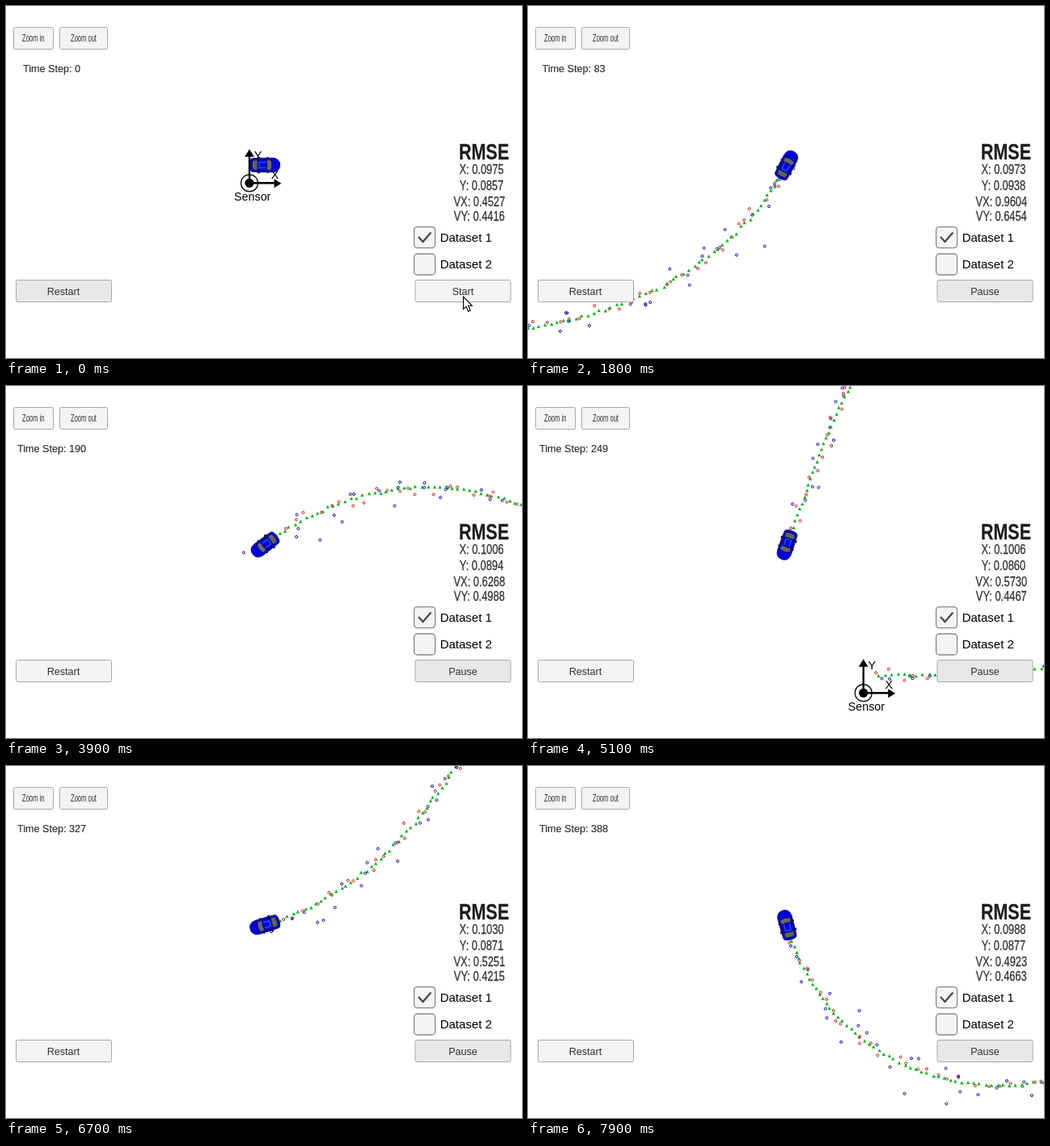
An HTML page with a canvas that plays this animation: 638 px wide and 436 px high, repeating every 8 s.

```html
<!DOCTYPE html>
<html lang="en">
<head>
<meta charset="utf-8">
<title>Tracking simulator</title>
<style>
  html, body { margin: 0; width: 100%; height: 100%; overflow: hidden; background: #fff; }
  canvas, svg { position: absolute; left: 0; top: 0; width: 638px; height: 436px; }
  text { font-family: "Liberation Sans", Arial, sans-serif; fill: #323232; text-anchor: middle; }
  .button rect { fill: #f4f4f4; stroke: #a8a8a8; }
  .button text, #step { font-size: 12.6px; }
  #step { stroke: #323232; stroke-width: .2; }
  .zoom text { font-size: 12px; }
  .box { fill: #f4f4f4; stroke: #868686; stroke-width: 1.3; }
  .label { font-size: 15px; fill: #000; text-anchor: start; }
  .panel text { font-size: 16.5px; stroke: #323232; stroke-width: .3; }
  .panel .title { font-size: 27.5px; font-weight: bold; fill: #1c1c1c; }
  #sensor text { font-size: 14.3px; fill: #000; }
</style>
</head>
<body>
<canvas id="trail" width="638" height="436"></canvas>
<svg viewBox="0 0 638 436">
  <g id="car">
    <path d="M3-10 5-7M3 10 5 7M-9-9.5h3M-9 9.5h3" stroke="#111" stroke-width="1.6"/>
    <path d="M-15.500-8.300Q-4-9 10-8.800Q18.700-8 18.700 0Q18.700 8 10 8.800Q-4 9-15.500 8.300Q-18.600 7.500-18.600 0Q-18.600-7.500-15.500-8.300Z" fill="#0000de" stroke="#00006c" stroke-width=".8"/>
    <path d="M-15-5.500Q-11-7-9-5.800V5.800Q-11 7-15 5.500Q-16.500 0-15-5.500Z" fill="#626262" stroke="#151535" stroke-width=".8"/>
    <path d="M2-5.600 7-7Q10.500 0 7 7L2 5.600Q3.500 0 2-5.600Z" fill="#686868" stroke="#151535" stroke-width=".8"/>
    <path d="M-9-7 2-7.200M-9 7 2 7.200" stroke="#101040" stroke-width="1.2"/>
    <path d="M-7-3.500H1M-7 3.500H1M-7-3.500V3.500" fill="none" stroke="#2f6ce0" stroke-width="1.1"/>
  </g>
  <g id="sensor">
    <path d="M0 0V-35M0 0H32" stroke="#000" stroke-width="2.4"/>
    <path d="M0-42 5.8-32.5H-5.8ZM39.5 .5 30.5-5V6Z"/>
    <circle r="10.5" fill="none" stroke="#000" stroke-width="1.2"/>
    <circle r="5.6"/>
    <text x="10.5" y="-29.5">Y</text>
    <text x="31.5" y="-5">X</text>
    <text x="3.7" y="22">Sensor</text>
  </g>

  <g class="button zoom">
    <rect x="9.5" y="26.5" width="49" height="27" rx="2"/>
    <rect x="66.5" y="26.5" width="59" height="27" rx="2"/>
    <text transform="translate(33.7 44.3) scale(.63 1)">Zoom in</text>
    <text transform="translate(96 44.3) scale(.63 1)">Zoom out</text>
  </g>
  <text id="step" x="56.5" y="82"></text>

  <g class="panel">
    <text class="title" transform="translate(591 189.5) scale(.78 1)">RMSE</text>
    <text class="rmse" transform="translate(588 208) scale(.78 1)"></text>
    <text class="rmse" transform="translate(588 228) scale(.78 1)"></text>
    <text class="rmse" transform="translate(585.3 248) scale(.78 1)"></text>
    <text class="rmse" transform="translate(585.3 266) scale(.78 1)"></text>
  </g>

  <rect class="box" x="504.6" y="273.6" width="26" height="26" rx="4"/>
  <rect class="box" x="504.6" y="307" width="26" height="26" rx="4"/>
  <path d="M510 286 515.5 292 525.5 280.5" fill="none" stroke="#4c4c4c" stroke-width="2.4"/>
  <text class="label" x="536.7" y="291.5">Dataset 1</text>
  <text class="label" x="536.7" y="325">Dataset 2</text>

  <g class="button">
    <rect id="restart" x="12.5" y="339.5" width="118" height="27" rx="2"/>
    <rect id="run" x="506" y="339.5" width="118" height="27" rx="2"/>
    <text x="71" y="357.6">Restart</text>
    <text id="runLabel" x="565" y="357.6"></text>
  </g>
  <path id="cursor" d="M565.5 360V375.5L569 372.3 571.7 378.3 574.2 377.2 571.6 371.3H576.3Z" fill="#fff" stroke="#000" stroke-width="1.1"/>
</svg>
<script>
const LOOP = 8000, FRAME = 100, STEPS = 400;
const CENTER = { x: 320, y: 197 }, SENSOR = { x: -19, y: 22.3 };
const $ = id => document.getElementById(id);
const ctx = $('trail').getContext('2d');
const rmseNodes = document.querySelectorAll('.rmse');
const rmseNames = ['X', 'Y', 'VX', 'VY'];

// time in ms, step, then the four errors
const keys = [
  [100, 0, .0975, .0857, 1.1775, .7247],
  [900, 40, .1018, .0885, 1.1775, .7247],
  [2800, 131, .0924, .0996, .7192, .5572],
  [3900, 190, .1006, .0894, .6268, .4988],
  [5100, 249, .1006, .0860, .5730, .4467],
  [6700, 327, .1030, .0871, .5251, .4215],
  [7900, 388, .0988, .0877, .4923, .4663]
];
const idleErrors = [.0975, .0857, .4527, .4416];

let seed = 20177;
const random = () => (seed = (seed * 48271) % 2147483647) / 2147483647;
const gauss = () => Math.sqrt(-2 * Math.log(random())) * Math.cos(2 * Math.PI * random());

// Figure eight: the turn rate is a sine over 500 steps
const phase = s => 2 * Math.PI * s / 500;
const heading = s => 125.5 * Math.PI / 180 * (1 - Math.cos(phase(s)));
const speed = s => 7.57 + .27 * Math.cos(2 * phase(s)) - .04 * Math.cos(phase(s));

const path = [{ x: 0, y: 0 }];
for (let s = 0; s < STEPS; s++) {
  const a = heading(s + .5), v = speed(s + .5);
  path.push({ x: path[s].x + v * Math.cos(a), y: path[s].y - v * Math.sin(a) });
}

// Lidar noise is Cartesian, radar noise is polar around the sensor
const marks = path.map((p, i) => {
  const radar = i % 2 === 1;
  const estimate = { x: p.x + gauss() * .9, y: p.y + gauss() * .9 };
  if (!radar) return { radar, estimate, x: p.x + gauss() * 4, y: p.y + gauss() * 4 };
  const dx = p.x - SENSOR.x, dy = p.y - SENSOR.y;
  const range = Math.hypot(dx, dy) + gauss() * 9;
  const angle = Math.atan2(dy, dx) + gauss() * .03;
  return { radar, estimate, x: SENSOR.x + range * Math.cos(angle), y: SENSOR.y + range * Math.sin(angle) };
});

function sample(t) {
  const i = Math.max(1, keys.findIndex(k => k[0] >= t));
  const a = keys[i - 1], b = keys[i];
  const f = Math.max(0, (t - a[0]) / (b[0] - a[0]));
  const [, step, ...errors] = a.map((v, j) => v + (b[j] - v) * f);
  const n = Math.round(step);
  if (n === 0) return { n, errors: idleErrors };
  if (n < 40) {
    errors[2] *= (40 / n) ** .5;
    errors[3] *= (40 / n) ** .4;
  }
  return { n, errors };
}

function drawTrail(n, ox, oy) {
  ctx.clearRect(0, 0, 638, 436);
  if (n === 0) return;
  for (const m of marks.slice(0, n + 1)) {
    ctx.strokeStyle = m.radar ? '#0000a8' : '#d01010';
    ctx.beginPath();
    ctx.arc(m.x + ox, m.y + oy, 1.5, 0, 7);
    ctx.stroke();
    const x = m.estimate.x + ox, y = m.estimate.y + oy;
    ctx.fillStyle = '#08b418';
    ctx.beginPath();
    ctx.moveTo(x, y - 2.2);
    ctx.lineTo(x + 2.2, y + 1.8);
    ctx.lineTo(x - 2.2, y + 1.8);
    ctx.fill();
  }
}

function render(now) {
  const t = Math.floor(now % LOOP / FRAME) * FRAME;
  const { n, errors } = sample(t);
  const running = n > 0;
  const ox = CENTER.x - path[n].x, oy = CENTER.y - path[n].y;
  drawTrail(n, ox, oy);
  const turn = -heading(n) * 180 / Math.PI;
  $('car').setAttribute('transform', `translate(${CENTER.x} ${CENTER.y}) rotate(${turn})`);
  $('sensor').setAttribute('transform', `translate(${SENSOR.x + ox} ${SENSOR.y + oy})`);
  $('step').textContent = `Time Step: ${n}`;
  rmseNodes.forEach((node, i) => node.textContent = `${rmseNames[i]}: ${errors[i].toFixed(4)}`);
  $('runLabel').textContent = running ? 'Pause' : 'Start';
  $('run').style.fill = running ? '#e8e8e8' : '#f4f4f4';
  $('restart').style.fill = running ? '#f4f4f4' : '#e8e8e8';
  $('cursor').style.display = running ? 'none' : '';
}

function loop() {
  render(performance.now());
  requestAnimationFrame(loop);
}
loop();
</script>
</body>
</html>
```
